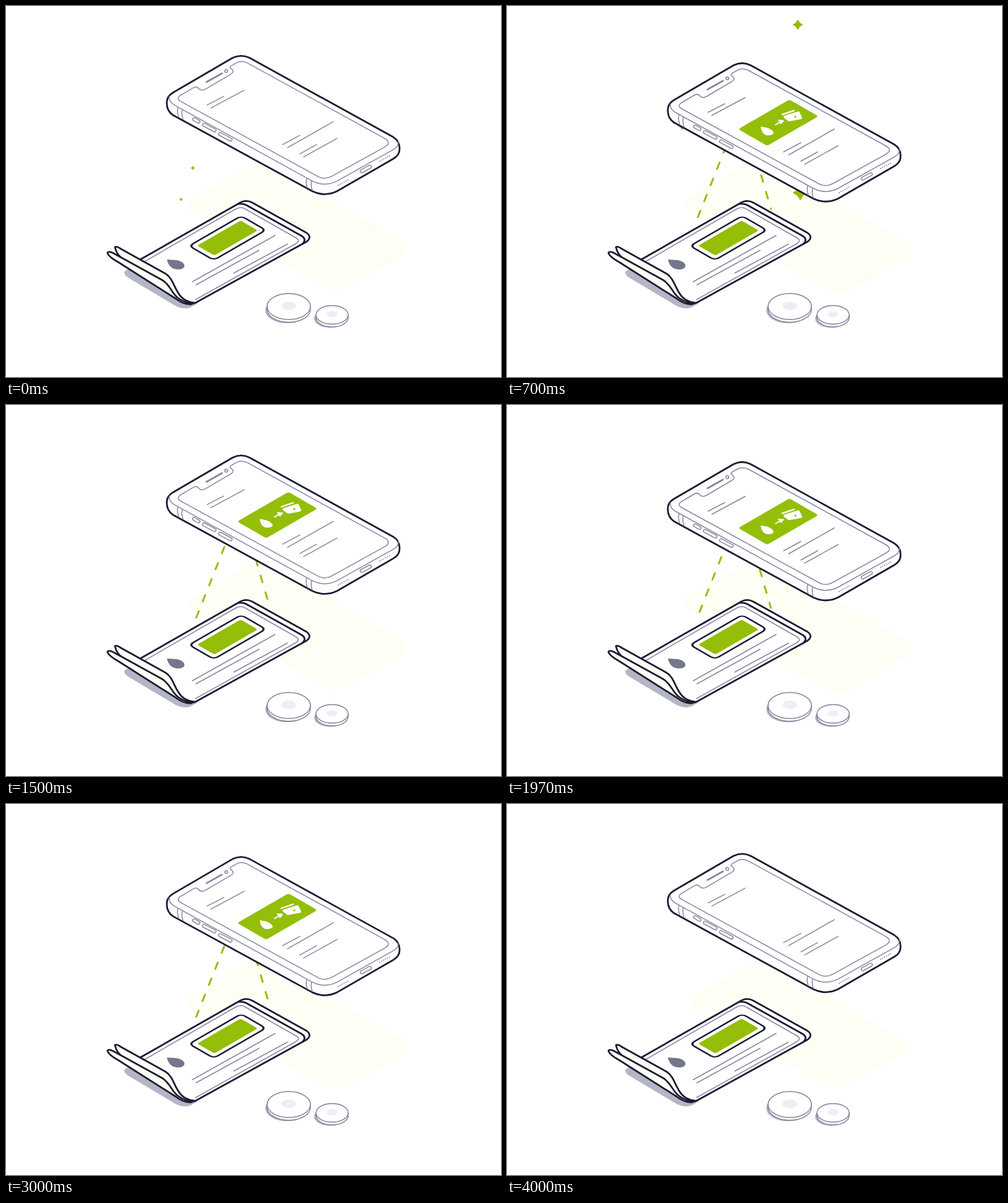
Write an HTML page that moves like this. It is 800 px wide and 600 px high and loops after 4030 ms.

```html
<!DOCTYPE html>
<html lang="en">
<head>
<meta charset="utf-8">
<title>Scan and pay</title>
<style>
html, body { margin: 0; width: 100%; height: 100%; overflow: hidden; background: #fff; }
svg { display: block; width: 800px; height: 600px; fill: none; stroke-linecap: round; stroke-linejoin: round; }
.dark { stroke: #1c1b33; stroke-width: 2.8; }
.thin { stroke: #85879d; stroke-width: 1.5; }
.rim { stroke: #7c7f98; stroke-width: 1.4; }
.paper { fill: #fff; }
.cream { fill: #fdfef4; }
.shade { fill: #b4b5c5; }
.green { fill: #94be08; }
.beam, .ray { stroke: #94be08; stroke-width: 3; }
.ray { stroke-width: 2.6; }
.slot { stroke: #85879d; stroke-width: 6.4; }
.slot + .slot { stroke: #fff; stroke-width: 3.4; }
.holes { stroke: #85879d; stroke-width: 2; stroke-dasharray: 0 3.6; }
</style>
</head>
<body>
<svg viewBox="0 0 800 600">
  <defs>
    <clipPath id="wipe"><rect id="wipeBox" y="-1" height="56"/></clipPath>
  </defs>

  <g id="plate">
    <rect x="-73" y="-143" width="146" height="286" rx="22" fill="#fdfff4"
          transform="matrix(.866 -.5 .866 .5 471.5 357)"/>
  </g>

  <g id="coins"></g>

  <!-- bill -->
  <path class="shade" d="M191 430L198 425L290 470L310 481L297 488Q286 491 274 485L197 439Q191 435 191 430Z"/>
  <path class="dark paper" d="M217 410L375 320Q387 312 398 318L486 367Q495 374 486 381L308 479Q298 485 282 476L217 430Z"/>
  <path class="dark" d="M376 320Q385 319 392 324L478 372Q486 377 480 384"/>
  <path class="thin" d="M221 415L370 329Q380 323 388 329L467 374Q477 379 469 384L306 475"/>
  <path class="thin" d="M301 446L435 371M307 451L409 395M368 432L455 385"/>
  <path class="dark cream" d="M176 390Q179 388 186 393L258 433C276 444 271 476 304 480Q285 482 274 470L190 410Q179 403 176 390Z"/>
  <path class="dark cream" d="M164 399Q166 396 174 400L252 443C272 455 263 472 300 482Q288 484 274 473L181 414Q165 405 164 399Z"/>
  <path fill="#73768d" d="M260 410L276 411C292 414 293 427 276 426C266 425 262 418 260 410Z"/>
  <g transform="matrix(.866 -.5 .866 .5 296 388)">
    <rect class="dark paper" width="97" height="46" rx="7"/>
    <rect class="green" x="8" y="7" width="81" height="32" rx="3"/>
  </g>

  <path class="beam" id="beamL"/>
  <path class="beam" id="beamR"/>
  <g id="stars" class="green"></g>

  <g id="phone">
    <path class="dark paper" d="M270 140L366 84Q380 77 394 84L626 212Q637 219 636 232Q636 241 626 247L535 299.5Q515 309 495 299.5L270 176.5Q259 169 260 155Q260 146 270 140Z"/>
    <path class="thin" d="M264 146Q263 155 272 160L495 283Q515 293 535 283L628 231Q635 226 634 219"/>
    <path class="thin" d="M278 164Q276 171 279 179M285 168Q283 175 286 183M486 279Q484 286 487 294M494 283Q492 290 495 298"/>
    <path class="thin" d="M281 145L303 132Q309 129 312 134Q316 138 323 134L362 111Q370 107 365 102Q359 99 365 96L374 91Q381 88 390 92L612 214Q624 221 612 228L527 275Q515 282 503 275L282 154Q275 150 281 145Z"/>
    <path class="thin" style="stroke-width:2.8" d="M324 123L349 109"/>
    <circle class="thin" cx="356" cy="105" r="2.4"/>
    <path class="thin" d="M325 160L352 146M331 165L385 136M447 224L475 209M455 229L529 187M475 239L502 224M481 244L535 214"/>
    <g id="slots"></g>
    <path class="holes" d="M537 290L555 280M604 251L622 241M569 271L569 271M595 257L595 257"/>

    <!-- message card -->
    <g transform="matrix(.866 -.5 .866 .5 373.5 187.3)">
      <rect class="green" width="96" height="54" rx="4" clip-path="url(#wipe)"/>
    </g>
    <g fill="#fff" stroke="#fff">
      <path id="drop" stroke="none" d="M410 183L421 185Q431 189 431 194Q427 198 419 197Q411 194 410 183Z"/>
      <path id="arrow" stroke-width="2" d="M434 180L441 176M439 173L446.5 173.5L443 178Z"/>
      <g id="wallet">
        <path stroke-width="2.5" d="M445 163.5L464 157"/>
        <path stroke-width="4" d="M449 167.5L471 160.5L475 169L456 172.5Z"/>
        <circle class="green" stroke="none" cx="466" cy="167" r="1.6"/>
      </g>
    </g>
  </g>

  <path class="ray" id="ray0"/>
  <path class="ray" id="ray1"/>
  <path class="ray" id="ray2"/>
</svg>
<script>
const LOOP = 4030;
const $ = id => document.getElementById(id);
const mix = (a, b, p) => a + (b - a) * p;
const ease = (t, from, to) => {
  const p = Math.min(1, Math.max(0, (t - from) / (to - from)));
  return p * p * (3 - 2 * p);
};
const scaleAt = (id, x, y, s) =>
  $(id).setAttribute('transform', `translate(${x} ${y}) scale(${s}) translate(${-x} ${-y})`);

$('coins').innerHTML = [[457, 486, 35, 21], [527, 499.5, 26, 15]].map(([x, y, rx, ry]) => `
  <ellipse class="shade" cx="${x - 3}" cy="${y + 6}" rx="${rx}" ry="${ry}"/>
  <path class="rim paper" d="M${x - rx} ${y}v4.5a${rx} ${ry} 0 0 0 ${2 * rx} 0v-4.5"/>
  <ellipse class="rim paper" cx="${x}" cy="${y}" rx="${rx}" ry="${ry}"/>
  <ellipse cx="${x}" cy="${y - 1}" rx="${rx * .33}" ry="${ry * .33}" fill="#eeeef4"/>`).join('');

$('slots').innerHTML = ['M304 183L311 187', 'M320 192L337 201', 'M346 207L363 216', 'M575 267L588 260']
  .map(d => `<g><path class="slot" d="${d}"/><path class="slot" d="${d}"/></g>`).join('');

// x, start y, end y, birth, death, radius
const stars = [
  [283, 325, 165, -70, 870, 12],
  [302, 270, 225, -70, 330, 6],
  [474, 387, 240, 320, 980, 12],
  [470, 48, 14, 450, 930, 8]
];
const rays = [[504, 120, 508.5, 99], [535, 127, 574, 105], [547, 148, 575, 143]];

function star([x, y0, y1, birth, death, r], t) {
  const p = (t - birth) / (death - birth);
  if (p <= 0 || p >= 1) return '';
  const s = r * Math.sin(Math.PI * p) / 12;
  return `<path transform="translate(${x} ${mix(y0, y1, p)}) scale(${s})" d="M-1.5 -11
    Q0 -13 1.5 -11Q4 -4 11 -1.5Q13 0 11 1.5Q4 4 1.5 11Q0 13 -1.5 11Q-4 4 -11 1.5Q-13 0 -11 -1.5Q-4 -4 -1.5 -11Z"/>`;
}

// draws the part of a segment between two fractions of its length
function trim(id, [x0, y0, x1, y1], a, b) {
  const el = $(id);
  el.setAttribute('d', `M${mix(x0, x1, a)} ${mix(y0, y1, a)}L${mix(x0, x1, b)} ${mix(y0, y1, b)}`);
  el.style.display = b - a > .005 ? '' : 'none';
}

function beam(id, seg, phase, t) {
  const a = ease(t, 3500, 3760), b = ease(t, 120, 500);
  trim(id, seg, a, b);
  const length = Math.hypot(seg[2] - seg[0], seg[3] - seg[1]);
  $(id).style.strokeDasharray = '11 17';
  $(id).style.strokeDashoffset = a * length - phase - .038 * t;
}

function draw(now) {
  const t = now % LOOP;
  const bob = (1 - Math.cos(2 * Math.PI * (t - 33) / 1333)) / 2;
  $('phone').setAttribute('transform', `translate(0 ${12 * bob})`);
  scaleAt('plate', 471.5, 357, 1 + .05 * bob);

  beam('beamL', [358.7, 215, 307.5, 344], 14.5, t);
  beam('beamR', [401, 240, 426.5, 328], 8.5, t);

  const left = 96 * ease(t, 3420, 3820), right = 96 * ease(t, 160, 560);
  $('wipeBox').setAttribute('x', left);
  $('wipeBox').setAttribute('width', Math.max(0, right - left));

  const pop = (on, off) => ease(t, on, on + 180) - ease(t, off, off + 120);
  scaleAt('drop', 420, 191, pop(320, 3400));
  scaleAt('arrow', 441, 176, pop(420, 3440));
  scaleAt('wallet', 462, 166, pop(500, 3500));

  rays.forEach((r, i) => trim('ray' + i, r, ease(t, 1000, 1250), ease(t, 760, 1000)));
  $('stars').innerHTML = stars.map(s => star(s, t)).join('');
}

const start = performance.now();
function tick() {
  draw(performance.now() - start);
  requestAnimationFrame(tick);
}
tick();
</script>
</body>
</html>
```
